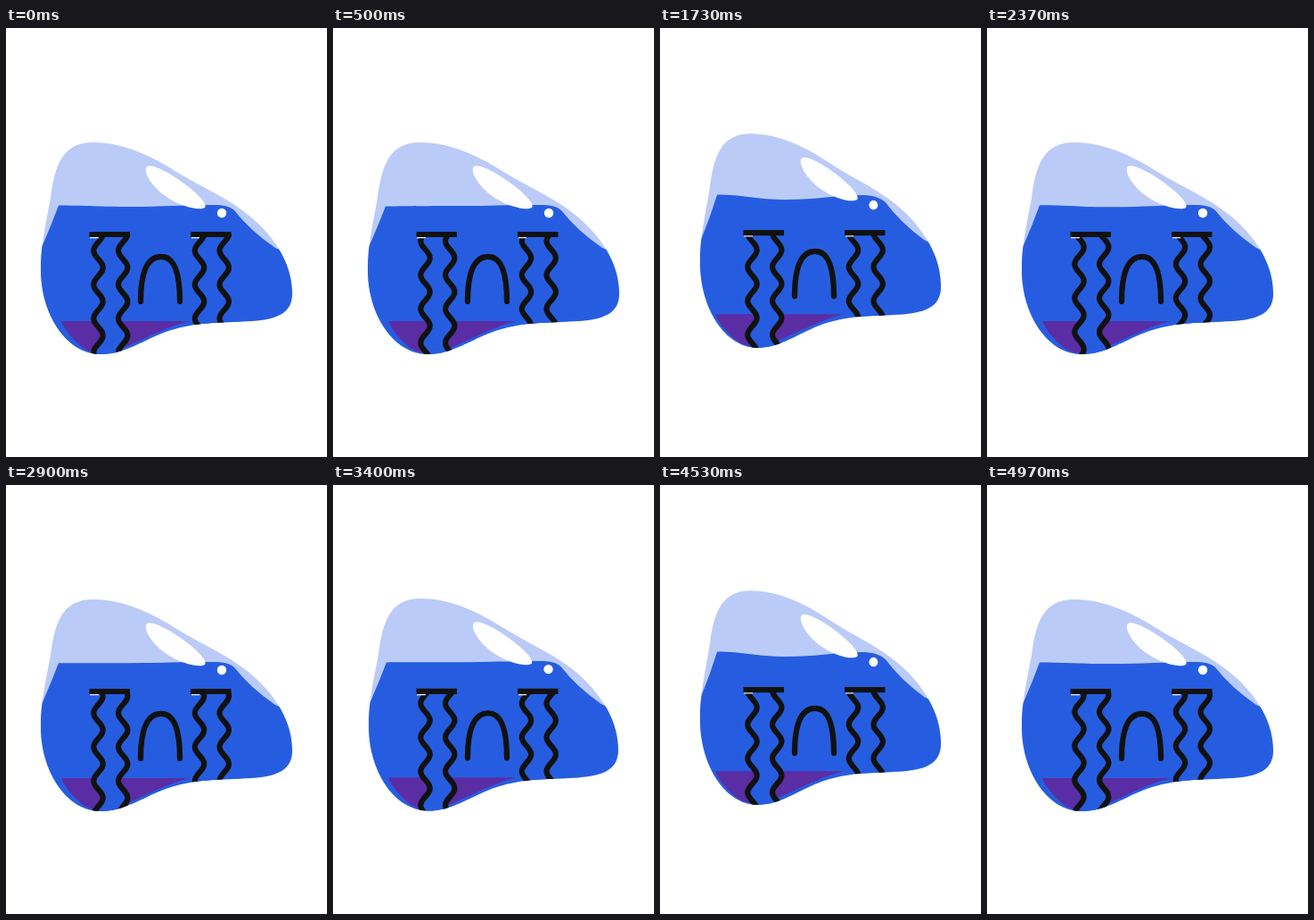
An HTML page that plays this animation: 360 px wide and 480 px high, repeating every 5000 ms.

```html
<!DOCTYPE html>
<html lang="en">
<head>
<meta charset="utf-8">
<title>Crying blob</title>
<style>
  html, body { margin: 0; width: 100%; height: 100%; overflow: hidden; background: #fff; }
  svg { display: block; width: 100vw; height: 100vh; }
  .ink { fill: none; stroke: #111; stroke-width: 6.2; stroke-linecap: round; stroke-linejoin: round; }
  .water { fill: #265de0; }
  .shine { fill: #fff; }
</style>
</head>
<body>
<svg viewBox="0 0 360 480">
  <defs>
    <clipPath id="body">
      <path class="jelly" d="M98 128C132 128 165 144 193 162C224 181 256 193 282 218C308 243 321 270 321 297C321 318 306 326 275 328C235 330 215 329 185 338C152 349 135 365 106 365C68 365 38 320 39 268C39 240 47 208 50 190C55 152 64 128 98 128Z"/>
    </clipPath>
  </defs>
  <g clip-path="url(#body)">
    <rect width="360" height="480" fill="#bbcbf7"/>
    <g class="jelly"><path id="water" class="water"/></g>
    <path id="pool" fill="#5a2da4" d="M62 328H206C180 334 160 346 134 357C112 366 96 366 84 356C74 347 66 338 62 328Z"/>
    <g id="tears"></g>
  </g>
  <g class="jelly shine">
    <path d="M158 155C165 151 190 166 205 178C218 188 226 198 223 201C216 205 195 199 180 189C164 178 153 161 158 155Z"/>
    <circle cx="242" cy="207" r="5.2"/>
  </g>
  <g id="lids">
    <path d="M94 234.5H104M208 234.5H217" stroke="#e4eafb" stroke-width="1.6"/>
    <path class="ink" style="stroke-linecap:butt" d="M93.5 231H139M207 231H252.5"/>
  </g>
  <path id="mouth" class="ink" d="M151 306C151 274 158 255.8 174 255.8C189 255.8 195 274 195 306"/>
</svg>
<script>
const LOOP = 5000;
const HOPS = [580, 1513, 3380, 4313];
const WAVE = 38;     // wavelength of a tear, px
const FLOW = 0.0545; // speed of the tears, px per ms

// Pose of one sob, by ms since its start.
const TIMES = [0, 20, 87, 140, 217, 300, 350, 440];
const POSE = {
  dy:    [0, -0.7, -6.5, -8.5, -8.5, -5.5, -3.5, 0],
  sx:    [1, 0.993, 0.95, 0.94, 0.957, 1.025, 1.018, 1],
  sy:    [1, 1.002, 1.013, 1.047, 1.012, 0.925, 0.934, 1],
  mouth: [0, -0.5, -5, -8, -6, -1, 0, 0],
  slosh: [0, 0, 0, 0, 2, 8, 12, 0]
};

const $ = id => document.getElementById(id);
const jelly = document.querySelectorAll('.jelly');
const shift = (node, y) => node.setAttribute('transform', `translate(0 ${y})`);

function addPath(className) {
  const path = document.createElementNS('http://www.w3.org/2000/svg', 'path');
  path.setAttribute('class', className);
  return $('tears').appendChild(path);
}
const streams = [103.5, 217].map(x => ({ x, fill: addPath('water'), line: addPath('ink') }));

function sample(values, ms) {
  let i = 1;
  while (i < TIMES.length - 1 && ms > TIMES[i]) i++;
  const k = (ms - TIMES[i - 1]) / (TIMES[i] - TIMES[i - 1]);
  return values[i - 1] + (values[i] - values[i - 1]) * k;
}

function wave(x, crest) {
  const points = [];
  for (let y = 232; y <= 374; y += 2) {
    const dx = 5.2 * Math.cos((y - crest) * 2 * Math.PI / WAVE);
    points.push(`${(x + dx).toFixed(2)} ${y}`);
  }
  return points;
}

function surface(slosh, sway) {
  const left = 198.5 - slosh + sway, mid = 200 - sway, right = 198 - slosh;
  return `M30 262L41 243Q51 220 59 ${left}C90 ${left} 105 ${mid} 140 ${mid}` +
    `S200 ${right} 228 ${right}C240 ${right} 249 198 256 204Q274 227 302 246L340 262V390H30Z`;
}

function draw(now) {
  const t = now % LOOP;
  const start = HOPS.findLast(h => h <= t) ?? -LOOP;
  const ms = Math.min(t - start, TIMES.at(-1));
  const pose = {};
  for (const key in POSE) pose[key] = sample(POSE[key], ms);

  const move = `translate(180 ${246 + pose.dy}) scale(${pose.sx} ${pose.sy}) translate(-180 -246)`;
  jelly.forEach(node => node.setAttribute('transform', move));
  shift($('mouth'), pose.mouth);
  shift($('lids'), pose.mouth * 0.3);
  shift($('pool'), pose.mouth * 1.3);
  $('water').setAttribute('d', surface(pose.slosh, Math.sin(t * 4 * Math.PI / LOOP)));

  const crest = 230 + FLOW * t;
  for (const { x, fill, line } of streams) {
    const a = wave(x, crest), b = wave(x + 27.7, crest);
    line.setAttribute('d', `M${a.join('L')}M${b.join('L')}`);
    fill.setAttribute('d', `M${a.concat(b.reverse()).join('L')}Z`);
  }
}

const begin = performance.now();
function tick() {
  draw(performance.now() - begin);
  requestAnimationFrame(tick);
}
tick();
</script>
</body>
</html>
```
